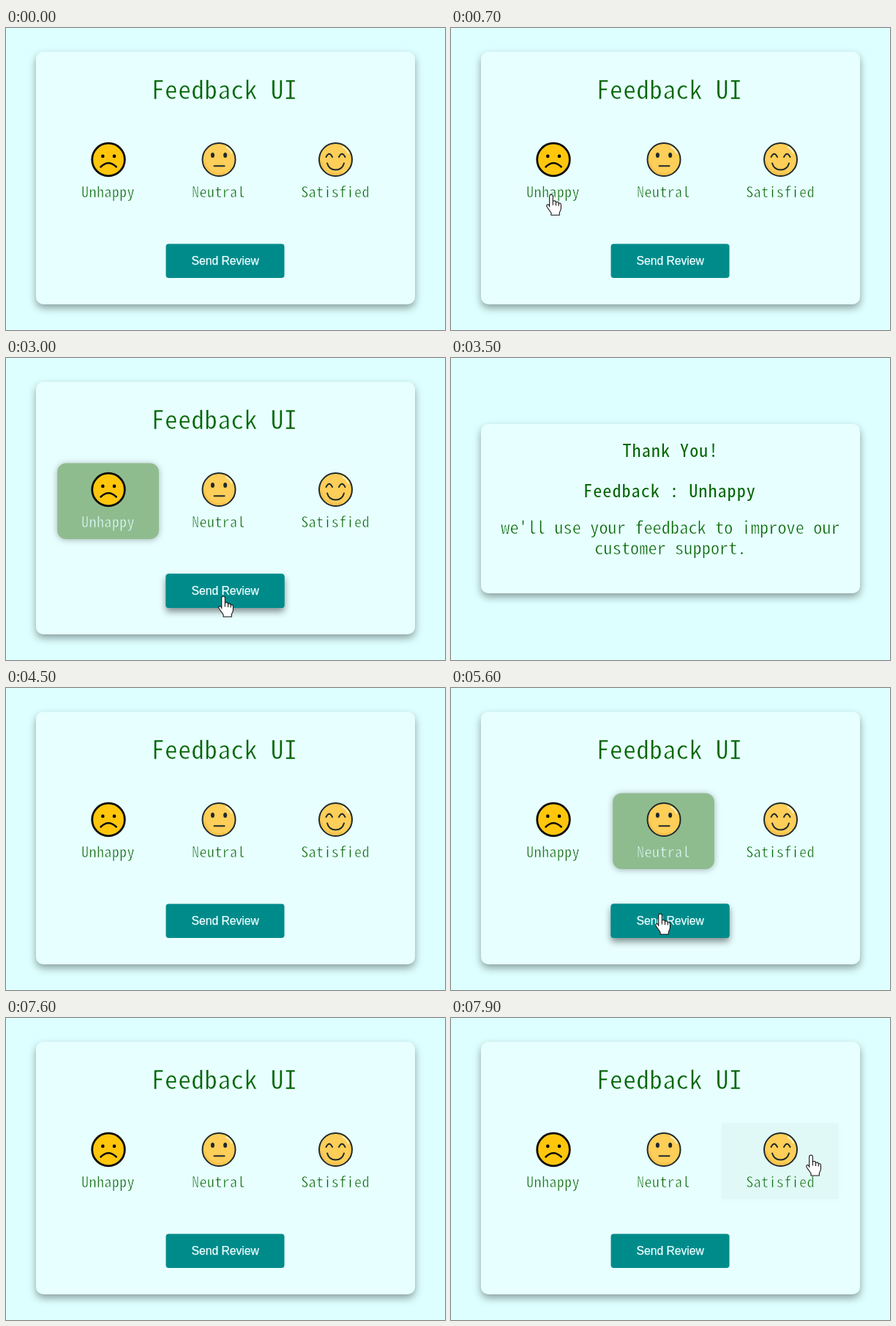
An HTML page for the animation above (8000 ms loop, 600 by 412 pixels).

```html
<!DOCTYPE html>
<html lang="en">
<head>
<meta charset="utf-8">
<title>Feedback UI</title>
<style>
  html, body { margin: 0; width: 100%; height: 100%; overflow: hidden; background: #deffff; }
  svg { display: block; width: 100%; height: 100%; }
  text { text-anchor: middle; fill: #006400; white-space: pre; }
  .mono { font-family: "Noto Sans Mono CJK JP", "Noto Sans Mono CJK KR", "Noto Sans Mono CJK SC", "Liberation Mono", monospace; }
  .thin { stroke: #e8ffff; stroke-width: .6; }
  .send { font: 15.7px "Liberation Sans", Arial, sans-serif; fill: #eff; stroke: #eff; stroke-width: .25; }
  .card { filter: drop-shadow(0 5px 5.5px rgba(0,0,0,.38)); }
  .pick { fill: #8fbc8f; filter: drop-shadow(0 1px 4px rgba(0,0,0,.3)); }
  .lift { filter: drop-shadow(0 5px 5px rgba(0,0,0,.45)); }
  .line { fill: none; stroke-linecap: round; }
  .cursor { fill: #fff; stroke: #111; stroke-width: 1.1; stroke-linejoin: round; }
</style>
</head>
<body>
<svg viewBox="0 0 600 412" xmlns="http://www.w3.org/2000/svg">
  <defs>
    <g id="sad">
      <circle r="22.3" fill="#ffc60c" stroke="#0b0b08" stroke-width="2.8"/>
      <circle cx="-7.7" cy="-4.6" r="2.3"/><circle cx="8" cy="-4.6" r="2.3"/>
      <path class="line" d="M-10.5 10Q0 -.5 10.8 10" stroke="#0b0b08" stroke-width="2.5"/>
    </g>
    <g id="base">
      <circle r="22.5" fill="#fdce58" stroke="#1f2a2c" stroke-width="2"/>
      <path class="line" d="M-19.5 3A19.8 19.8 0 0 0 8 18" stroke="#f9c04a" stroke-width="2"/>
      <path class="line" d="M10 -17Q15 -14.5 17.5 -9" stroke="#fff0c4" stroke-width="2"/>
    </g>
    <g id="flat">
      <use href="#base"/>
      <ellipse cx="-8.6" cy="-6" rx="2.5" ry="3.6" fill="#1f2a2c"/>
      <ellipse cx="8.6" cy="-6" rx="2.5" ry="3.6" fill="#1f2a2c"/>
      <path class="line" d="M-6.5 8.7H7.5" stroke="#1f2a2c" stroke-width="2"/>
    </g>
    <g id="glad">
      <use href="#base"/>
      <path class="line" d="M-13 -3.5Q-8.7 -12 -4.5 -3.5M4.5 -3.5Q8.7 -12 13 -3.5M-11.5 5Q-9 14 0 14T11.5 5" stroke="#1f2a2c" stroke-width="2"/>
    </g>
  </defs>

  <rect width="600" height="412" fill="#deffff"/>
  <rect id="card" class="card" x="41" width="518" rx="10" fill="#e8ffff"/>

  <g id="form">
    <text class="mono thin" x="298.5" y="96.5" font-size="35" data-cell="18.1">Feedback UI</text>
    <g id="options"></g>
    <rect id="lift" class="lift" x="218.5" y="294.5" width="162" height="46.5" rx="4" fill="#008b8b"/>
    <rect x="218.5" y="294.5" width="162" height="46.5" rx="4" fill="#008b8b"/>
    <text class="send" x="299.7" y="322.5">Send Review</text>
  </g>

  <g id="thanks">
    <text class="mono" x="300" y="135" font-size="24" data-cell="13.1">Thank You!</text>
    <text id="answer" class="mono" x="299" y="189.5" font-size="24" data-cell="13.1"></text>
    <text class="mono thin" x="300" y="240" font-size="24" data-cell="12.2">we'll use your feedback to improve our</text>
    <text class="mono thin" x="300" y="268" font-size="24" data-cell="12.2">customer support.</text>
  </g>

  <path id="hand" class="cursor" d="M-2.3 2.5Q-2.3 0 0 0T2.3 2.5V9Q6 7.5 6.5 10.5Q9.7 9 10.2 12Q13.4 11 13.4 14V19Q13 22 11.3 24.5V28H0V25L-5.7 17Q-7 14 -4.8 13.5Q-3.5 13.5 -2.3 15.5ZM-2.3 3V17M2.3 9V14.5M6.5 10.5V15M10.2 12V15.5"/>
  <path id="arrow" class="cursor" d="M0 0V16.5L3.8 13 6.4 19 8.9 18 6.3 12.2H11.6Z"/>
</svg>
<script>
const LOOP = 8000, STEP = 100, FADE = 300;
const CARD = [232, 255, 255], SAGE = [143, 188, 143], GREEN = [0, 100, 0], PALE = [224, 255, 255];
const ENTRY = { x: 484, y: 66 }, EXIT = { x: 380, y: 24 };

const $ = id => document.getElementById(id);
const put = (el, attrs) => { for (const k in attrs) el.setAttribute(k, attrs[k]); };
const show = (el, on) => { el.style.display = on ? '' : 'none'; };

const options = [
  { name: 'Unhappy', face: 'sad', x: 139.5 },
  { name: 'Neutral', face: 'flat', x: 290.5 },
  { name: 'Satisfied', face: 'glad', x: 450 }
];

// each visit: the pointer enters, touches an option, leaves it and presses the button
const visits = [
  { option: options[0], spot: { x: 131, y: 230 }, hit: { x: 297, y: 325 },
    enter: 100, touch: 700, leave: 2200, press: 2950, reload: 4500 },
  { option: options[1], spot: { x: 300, y: 210 }, hit: { x: 286, y: 308 },
    enter: 4600, touch: 4780, leave: 5150, press: 5550, reload: 7600 },
  { option: options[2], spot: { x: 492, y: 187 }, hit: { x: 297, y: 325 },
    enter: 7650, touch: 7850, leave: LOOP, press: LOOP + 700, reload: 2 * LOOP }
];
for (const v of visits) {
  v.done = v.press + 150;
  v.stops = [
    { t: v.enter, ...ENTRY }, { t: v.touch + 50, ...v.spot }, { t: v.leave, ...v.spot },
    { t: v.press, ...v.hit }, { t: v.done, ...v.hit }, { t: v.done + 400, ...EXIT }
  ];
}

for (const o of options) {
  o.w = o.name.length * 10.4 + 66;
  const g = document.createElementNS('http://www.w3.org/2000/svg', 'g');
  g.innerHTML = `
    <rect class="pick" x="${o.x - o.w / 2}" y="143.5" width="${o.w}" height="103.5"/>
    <use href="#${o.face}" x="${o.x + .5}" y="179.5"/>
    <text class="mono thin" x="${o.x}" y="230.5" font-size="20" data-cell="10.4">${o.name}</text>`;
  $('options').append(g);
  o.box = g.querySelector('rect');
  o.label = g.querySelector('text');
}

// set the pitch of the fixed-width text
const pen = document.createElement('canvas').getContext('2d');
document.querySelectorAll('[data-cell]').forEach(el => {
  const css = getComputedStyle(el);
  pen.font = `${css.fontSize} ${css.fontFamily}`;
  el.style.letterSpacing = el.dataset.cell - pen.measureText('n').width + 'px';
});

const smooth = p => p * p * (3 - 2 * p);
const lerp = (a, b, p) => a + (b - a) * p;
const mix = (a, b, p) => `rgb(${a.map((v, i) => Math.round(lerp(v, b[i], p)))})`;
const fade = (t, on, off) => t < on || t >= off ? 0 : smooth(Math.min(1, (t - on) / FADE));

function pointer(t, { stops }) {
  const next = stops.findIndex(s => s.t > t);
  if (next < 1) return null;
  const a = stops[next - 1], b = stops[next];
  const p = smooth((t - a.t) / (b.t - a.t));
  return { x: lerp(a.x, b.x, p), y: lerp(a.y, b.y, p) };
}

function clickable({ x, y }) {
  const onOption = y >= 143 && y <= 247 && options.some(o => Math.abs(x - o.x) <= o.w / 2);
  return onOption || (x >= 218 && x <= 381 && y >= 294 && y <= 341);
}

function draw(t) {
  const visit = visits.find(v => t < v.reload);
  const sent = t >= visit.done;
  show($('form'), !sent);
  show($('thanks'), sent);
  put($('card'), sent ? { y: 90, height: 231 } : { y: 32.5, height: 344.5 });
  $('answer').textContent = 'Feedback : ' + visit.option.name;

  for (const o of options) {
    const p = o === visit.option ? fade(t, visit.touch, visit.done) : 0;
    put(o.box, { opacity: p, rx: 12 * p });
    o.label.style.fill = mix(GREEN, PALE, p);
    o.label.style.stroke = mix(CARD, SAGE, p);
  }
  put($('lift'), { opacity: fade(t, visit.press - 250, visit.done) });

  const at = pointer(t, visit);
  const hand = at && !sent && clickable(at);
  show($('hand'), hand);
  show($('arrow'), at && !hand);
  if (at) put(hand ? $('hand') : $('arrow'), { transform: `translate(${at.x} ${at.y})` });
}

const start = performance.now();
function tick() {
  const t = (performance.now() - start) % LOOP;
  draw(Math.floor(t / STEP) * STEP);
  requestAnimationFrame(tick);
}
tick();
</script>
</body>
</html>
```
